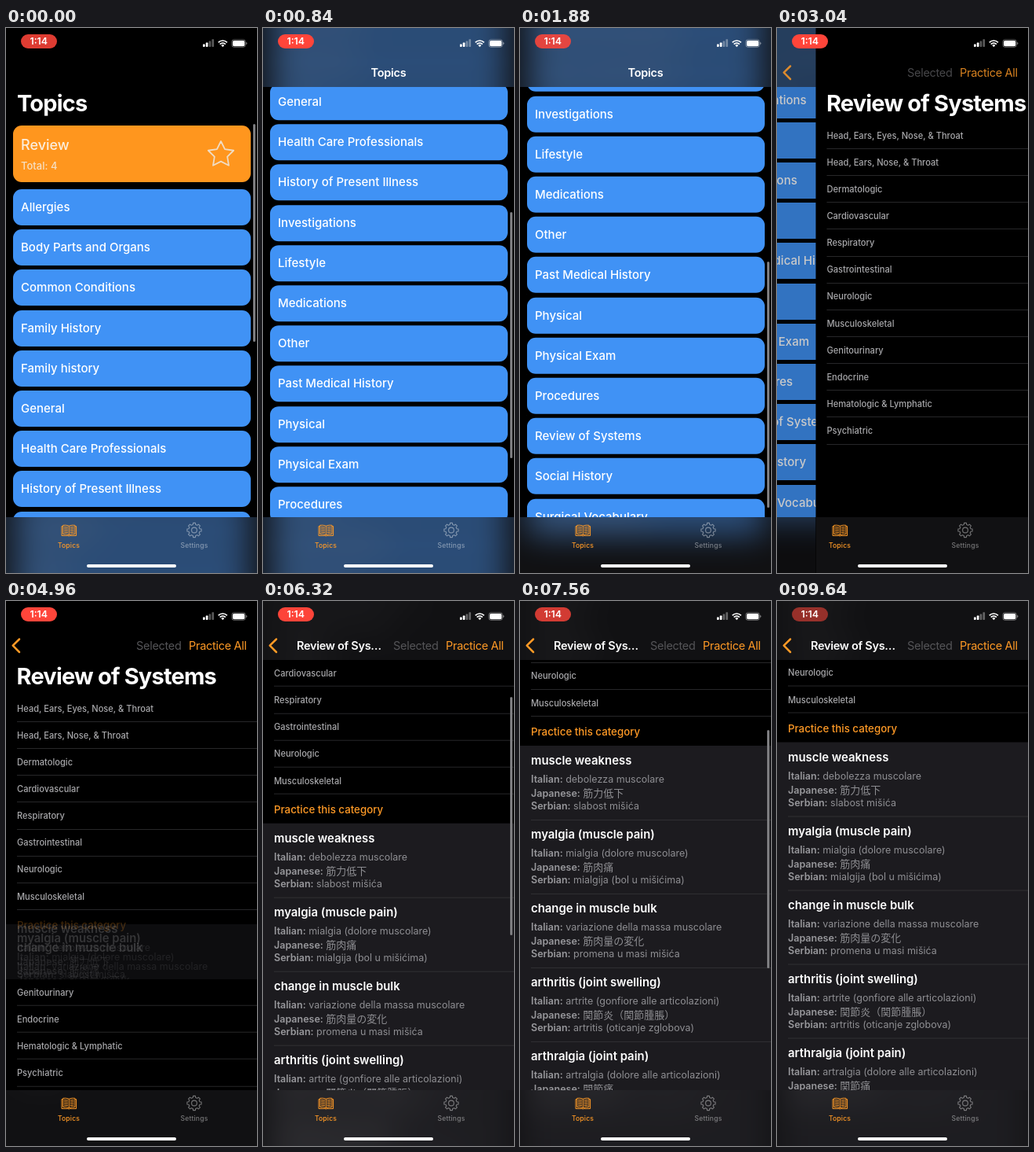
These frames come from a looping animation (320 px wide and 693 px high, 9680 ms). An HTML page:

```html
<!DOCTYPE html>
<html lang="en">
<head>
<meta charset="utf-8">
<title>Topics</title>
<style>
html, body { margin: 0; width: 100%; height: 100%; overflow: hidden; background: #000; }
#stage {
  position: absolute; left: 0; top: 0; width: 320px; height: 693px; overflow: hidden;
  background: #000; color: #fff; font-family: Inter, "Noto Sans CJK JP", "Noto Sans CJK", sans-serif;
}
#stage div, #stage svg { position: absolute; }
.page { left: 0; top: 0; width: 320px; height: 693px; overflow: hidden; background: #000; }
.list { left: 0; top: 0; width: 320px; }
.t { line-height: 20px; height: 20px; white-space: pre; }
.clip { left: 0; top: 75px; width: 320px; height: 80px; overflow: hidden; }
.large { font-size: 29px; font-weight: 700; letter-spacing: -.028em; }
.glass { left: 0; width: 320px; overflow: hidden; background: #000; }
.glass::after { content: ""; position: absolute; inset: 0; background: rgba(32, 32, 35, .55); }
.blur { left: 0; width: 320px; height: 693px; filter: blur(20px); }
.nav { top: 0; height: 75px; }
.tabs { top: 622px; height: 71px; }
.tabs .blur { top: -622px; }
.head { font-size: 14.5px; font-weight: 600; letter-spacing: -.02em; }
.action { font-size: 14.5px; letter-spacing: -.02em; }
.orange { color: #ff9a26; }
.card { left: 8.5px; width: 303px; border-radius: 11px; background: #4092f5; }
.row { font-size: 15px; font-weight: 500; }
.review { font-size: 18px; font-weight: 500; color: #fbeedd; }
.total { font-size: 13px; font-weight: 500; color: #f6dfc2; }
.cat { font-size: 11.1px; font-weight: 500; color: #a8a8ab; }
.practice { font-size: 13.3px; font-weight: 500; }
.line { left: 14px; width: 306px; height: 1px; background: #272729; }
.item { left: 0; width: 320px; height: 94px; }
.term { font-size: 14.9px; font-weight: 600; }
.sub { font-size: 12.5px; color: #8e8e92; }
.sub b { font-weight: 600; color: #98989c; }
.sub [lang=ja] { font-size: 13px; }
.thumb { left: 315px; width: 2.5px; border-radius: 2px; background: #7d7d80; }
.tab { font-size: 8.6px; font-weight: 500; letter-spacing: .15px; width: 80px; text-align: center; }
.idle { color: rgba(255, 255, 255, .42); }
#pill { left: 19px; top: 7.5px; width: 45.5px; height: 18px; border-radius: 9px; background: #ff453a; }
#clock { left: 18.5px; width: 46.5px; text-align: center; font-size: 12.4px; font-weight: 600; }
#home { left: 103px; top: 682px; width: 114px; height: 4.3px; border-radius: 3px; background: #fff; }
#shade { left: 0; top: 0; width: 320px; height: 693px; background: #000; }
#icons { left: 0; top: 0; }
</style>
</head>
<body>
<div id="stage">
  <div class="page" id="topic">
    <div class="list"></div>
    <div class="glass nav" id="topicNav"><div class="blur"><div class="list"></div></div></div>
    <div class="clip"><div class="t large" id="topicTitle" style="left:14px">Topics</div></div>
    <div class="t head" id="topicHead" style="left:0;width:320px;top:46.5px;text-align:center">Topics</div>
    <div class="thumb" id="topicThumb"></div>
    <div class="glass tabs"><div class="blur"><div class="list"></div></div></div>
    <div id="shade"></div>
  </div>
  <div class="page" id="review">
    <div class="list"></div>
    <div class="glass nav" id="reviewNav"><div class="blur"><div class="list"></div></div></div>
    <div class="clip"><div class="t large" id="reviewTitle" style="left:13.5px">Review of Systems</div></div>
    <div class="t head" id="reviewHead" style="left:43px;top:46.5px">Review of Sys…</div>
    <div class="thumb" id="reviewThumb"></div>
    <div class="glass tabs"><div class="blur"><div class="list"></div></div></div>
  </div>
  <div id="actions" style="left:0;top:0">
    <svg width="24" height="75" fill="none" stroke="#ff9a26" stroke-width="2.5" stroke-linecap="round" stroke-linejoin="round"><path d="M17 48.5L8.7 56.7L17 65"/></svg>
    <div class="t action" style="left:166px;top:46.5px;color:#555558">Selected</div>
    <div class="t action orange" style="left:233px;top:46.5px">Practice All</div>
  </div>
  <div id="pill"></div>
  <div class="t" id="clock" style="top:6.5px">1:14</div>
  <svg id="icons" width="320" height="693" fill="none">
    <g fill="#fff">
      <rect x="251" y="20.5" width="2.7" height="3.5" rx=".7"/>
      <rect x="254.8" y="18.6" width="2.7" height="5.4" rx=".7"/>
      <rect x="258.6" y="16.4" width="2.7" height="7.6" rx=".7" opacity=".35"/>
      <rect x="262.4" y="14.2" width="2.7" height="9.8" rx=".7" opacity=".35"/>
      <path d="M276.3 24.3l-2-2.2a2.8 2.8 0 0 1 4 0z"/>
      <rect x="289" y="15.9" width="15.3" height="7.4" rx="1.8"/>
      <path d="M306.2 18v3.2q1.2-.4 1.2-1.6t-1.2-1.6z" opacity=".5"/>
    </g>
    <g stroke="#fff" stroke-width="1.7">
      <path d="M270.7 18.3a8 8 0 0 1 11.2 0M272.7 20.6a5.1 5.1 0 0 1 7.2 0"/>
      <rect x="287.9" y="14.9" width="17.4" height="9.4" rx="2.7" stroke-width=".8" opacity=".5"/>
    </g>
    <g stroke="#ff9a26" stroke-linejoin="round">
      <path d="M80.3 633.2Q76.500 631.700 72.700 632.300V643.500Q76.500 643 80.300 644.500Q84.100 643 87.900 643.500V632.300Q84.100 631.700 80.300 633.200V644.500"/>
      <path d="M72.700 633.600H71V645.500H78.800Q80.300 646.500 81.800 645.500H89.600V633.600H87.900"/>
      <path d="M74 634.600l5 .4M74 636.800l5 .4M74 639l5 .4M74 641.200l5 .4M86.600 634.600l-5 .4M86.600 636.800l-5 .4M86.600 639l-5 .4M86.600 641.200l-5 .4"/>
    </g>
    <g stroke="#fff" stroke-opacity=".42" stroke-width="1.1" stroke-linejoin="round">
      <path id="gear"/>
      <circle cx="240" cy="638.500" r="3.400"/>
    </g>
  </svg>
  <div class="t tab orange" style="left:40px;top:647.500px">Topics</div>
  <div class="t tab idle" style="left:200px;top:647.500px">Settings</div>
  <div id="home"></div>
</div>
<script>
const LOOP = 9680, PITCH = 51.2, STEP = 34.15, CELL = 94, OPEN = 694, GROUP = 392.8;
const TOPICS = ['Allergies', 'Body Parts and Organs', 'Common Conditions', 'Family History', 'Family history', 'General',
  'Health Care Professionals', 'History of Present Illness', 'Investigations', 'Lifestyle', 'Medications', 'Other',
  'Past Medical History', 'Physical', 'Physical Exam', 'Procedures', 'Review of Systems', 'Social History',
  'Surgical Vocabulary'];
const ABOVE = ['Head, Ears, Eyes, Nose, &amp; Throat', 'Head, Ears, Nose, &amp; Throat', 'Dermatologic', 'Cardiovascular',
  'Respiratory', 'Gastrointestinal', 'Neurologic', 'Musculoskeletal'];
const BELOW = ['Genitourinary', 'Endocrine', 'Hematologic &amp; Lymphatic', 'Psychiatric'];
const TERMS = [
  ['muscle weakness', 'debolezza muscolare', '筋力低下', 'slabost mišića'],
  ['myalgia (muscle pain)', 'mialgia (dolore muscolare)', '筋肉痛', 'mialgija (bol u mišićima)'],
  ['change in muscle bulk', 'variazione della massa muscolare', '筋肉量の変化', 'promena u masi mišića'],
  ['arthritis (joint swelling)', 'artrite (gonfiore alle articolazioni)', '関節炎（関節腫脹）', 'artritis (oticanje zglobova)'],
  ['arthralgia (joint pain)', 'artralgia (dolore alle articolazioni)', '関節痛', 'artralgija (bol u zglobovima)']
];

const $ = id => document.getElementById(id);
const lists = name => [...document.querySelectorAll(`#${name} .list`)];
const clamp = (v, a = 0, b = 1) => Math.min(b, Math.max(a, v));
const lerp = (a, b, u) => a + (b - a) * u;
const span = (t, start, length) => clamp((t - start) / length);

function add(parent, cls, style = {}, html = '') {
  const el = document.createElement('div');
  el.className = cls;
  for (const k in style) el.style[k] = typeof style[k] === 'number' ? style[k] + 'px' : style[k];
  el.innerHTML = html;
  parent.append(el);
  return el;
}
const text = (parent, cls, left, mid, html) => add(parent, 't ' + cls, { left, top: mid - 10 }, html);

// Closed ring of points around a centre
function ring(cx, cy, count, radius, turn) {
  let d = '';
  for (let i = 0; i < count; i++) {
    const a = turn(i), r = radius(i);
    d += (i ? 'L' : 'M') + (cx + r * Math.cos(a)).toFixed(2) + ' ' + (cy + r * Math.sin(a)).toFixed(2);
  }
  return d + 'Z';
}
$('gear').setAttribute('d', ring(240, 638.5, 32, i => i % 4 < 2 ? 9.2 : 7.2,
  i => (Math.floor(i / 4) + [-.2, .2, .3, .7][i % 4]) * Math.PI / 4));
const star = ring(20, 21, 10, i => i % 2 ? 8.6 : 17, i => (i / 5 - .5) * Math.PI);

function buildTopics(list) {
  add(list, 'card', { top: 123.5, height: 72, background: '#ff961e' });
  text(list, 'review', 19, 149, 'Review');
  text(list, 'total', 19, 174.5, 'Total: 4');
  add(list, '', { left: 254, top: 140 },
    `<svg width="40" height="42" fill="none" stroke="#f0dcc4" stroke-width="1.8" stroke-linejoin="round"><path d="${star}"/></svg>`);
  TOPICS.forEach((name, i) => {
    const mid = 228 + i * PITCH;
    add(list, 'card', { top: mid - 23, height: 46 });
    text(list, 'row', 19, mid, name);
  });
}

function category(parent, name, mid) {
  text(parent, 'cat', 14, mid, name);
  add(parent, 'line', { top: mid + 16.5 });
}

// Fills a review list and returns the function that unfolds it
function buildReview(list) {
  ABOVE.forEach((name, i) => category(list, name, 136.5 + i * STEP));
  const group = add(list, '', { left: 0, top: GROUP, width: 320, overflow: 'hidden' });
  const panel = add(group, '', { left: 0, width: 320, height: OPEN, background: '#1c1b1f' });
  const practice = text(group, 'practice orange', 14, 19.4, 'Practice this category');
  const items = TERMS.map(([term, it, ja, sr]) => {
    const el = add(group, 'item');
    text(el, 'term', 14, 10, term);
    text(el, 'sub', 14, 34, `<b>Italian:</b> ${it}`);
    text(el, 'sub', 14, 51, `<b>Japanese:</b> <span lang="ja">${ja}</span>`);
    text(el, 'sub', 14, 68, `<b>Serbian:</b> ${sr}`);
    add(el, 'line', { top: 85, background: '#303033' });
    return el;
  });
  const tail = add(list, '', { left: 0, top: 0, width: 320 });
  BELOW.forEach((name, i) => category(tail, name, 409.6 + i * STEP));

  return (u, e) => {
    group.style.height = OPEN * e + 'px';
    panel.style.top = lerp(15, 37.4, e) + 'px';
    panel.style.opacity = Math.sqrt(u);
    practice.style.opacity = u;
    items.forEach((el, k) => {
      const rest = 56.4 + k * CELL;
      el.style.top = lerp(19.8, rest, e) - 10 + 'px';
      // Cells that end below the screen appear only once it is open
      el.style.opacity = GROUP + rest < 693 ? u ** 1.25 : Math.floor(u);
    });
    tail.style.transform = `translateY(${OPEN * e}px)`;
  };
}

// Each list has a sharp copy and one blurred behind each bar
const views = { topic: lists('topic'), review: lists('review') };
views.topic.forEach(buildTopics);
const unfold = views.review.map(buildReview);

// Finger drag that runs into an exponential glide
function flick(t, start, release, end, left, tau) {
  const reach = end - left;
  if (t < release) return reach * span(t, start, release - start) ** 1.45;
  return end - left * Math.exp((release - t) / tau);
}

function scrollTo(name, s, rate, length, thumbAlpha) {
  const folded = clamp((s - 34) / 12);
  for (const list of views[name]) list.style.transform = `translateY(${-s}px)`;
  $(name + 'Title').style.top = 11 - s + 'px';
  $(name + 'Nav').style.opacity = folded;
  $(name + 'Head').style.opacity = folded;
  const thumb = $(name + 'Thumb').style;
  thumb.top = Math.max(78, 122 - s) + rate * Math.max(0, s - 46) + 'px';
  thumb.height = lerp(277, length, clamp(s / 46)) + 'px';
  thumb.opacity = thumbAlpha;
}

function draw(t) {
  scrollTo('topic', flick(t, 86, 400, 548, 382, 500), .455, 313, 1 - span(t, 2400, 300));
  scrollTo('review', flick(t, 5870, 6100, 250.5, 180.6, 395), .43, 303, span(t, 5870, 80) * (1 - span(t, 7900, 300)));

  // Push to the second screen
  const push = 1 - (1 - span(t, 2800, 520)) ** 3;
  $('topic').style.transform = `translateX(${-96 * push}px)`;
  $('topic').style.visibility = push < 1 ? 'visible' : 'hidden';
  $('review').style.transform = `translateX(${320 * (1 - push)}px)`;
  $('review').style.visibility = push > 0 ? 'visible' : 'hidden';
  $('shade').style.opacity = push * .25;
  $('actions').style.opacity = push;

  const u = span(t, 4880, 350), e = (1 - Math.cos(Math.PI * u)) / 2;
  unfold.forEach(open => open(u, e));

  // Recording pulse
  const d = (t - 240 + 940) % 1880 - 940;
  $('pill').style.opacity = 1 - .45 * Math.exp(-((d / 215) ** 2));
}

const begin = performance.now();
function tick() {
  draw((performance.now() - begin) % LOOP);
  requestAnimationFrame(tick);
}
tick();
</script>
</body>
</html>
```
